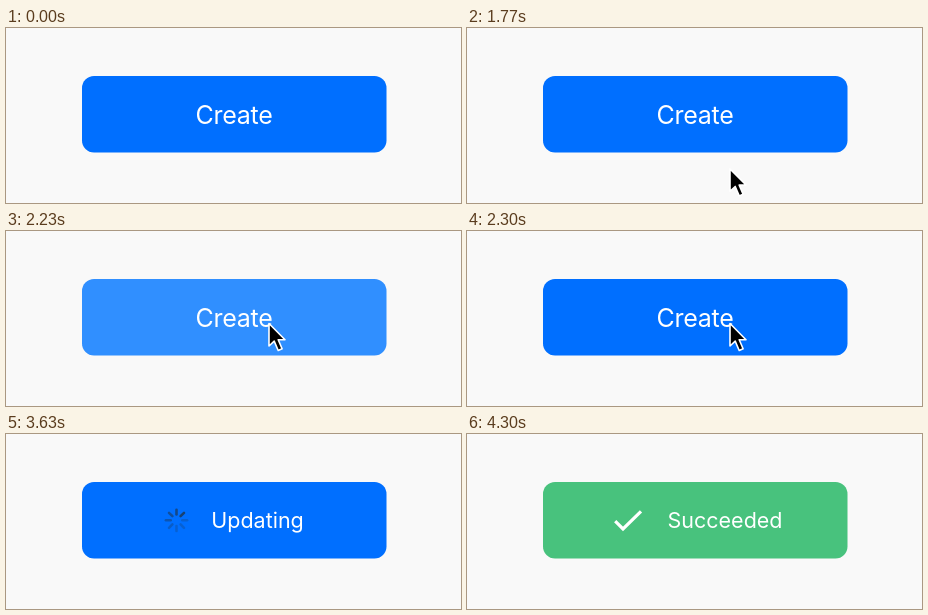
An HTML page for the animation above (4710 ms loop, 455 px wide and 175 px high).

```html
<!DOCTYPE html>
<html lang="en">
<head>
<meta charset="utf-8">
<title>Button states</title>
<style>
  html, body { margin: 0; width: 100%; height: 100%; overflow: hidden; background: #f9f9f9; }
  svg { display: block; width: 455px; height: 175px; }
  text { font: 400 21.5px Inter, Roboto, sans-serif; fill: #fff; text-anchor: middle; }
  #create { font-size: 25px; letter-spacing: -.25px; }
</style>
</head>
<body>
<svg viewBox="0 0 455 175">
  <rect id="button" x="76" y="48" width="304.5" height="76.5" rx="12"/>
  <text id="create" x="228" y="95.5">Create</text>
  <g id="updating">
    <g id="spinner" transform="translate(170.5 86.3)" stroke="#1d3a5c" stroke-width="2.6" stroke-linecap="round"></g>
    <text x="251.5" y="93.7">Updating</text>
  </g>
  <g id="done">
    <path d="M148.2 87.2 156 95 174 77.3" fill="none" stroke="#fff" stroke-width="3.2"/>
    <text x="258" y="93.7">Succeeded</text>
  </g>
  <path id="cursor" d="M0 0V22.5L5.2 17.6 9.2 27 13.1 25.3 9.2 16.2H16Z"
    stroke="#fff" stroke-width="1.6" stroke-linejoin="round"/>
</svg>
<script>
const LOOP = 4710, PRESS = 2230, RELEASE = 2300, UPDATE = 2630, DONE = 4300;
const ENTER = 1700, ARRIVE = 2000, LEAVE = 2430;
const SPOKES = 8, STEP = 125, SPIN_START = 2770;
const TIP = { x: 263, y: 92.5 }, TRAVEL = 83;

const $ = id => document.getElementById(id);
const show = (id, on) => $(id).style.display = on ? '' : 'none';
const clamp = v => Math.min(1, Math.max(0, v));

const spokes = Array.from({ length: SPOKES }, (_, i) => {
  const line = document.createElementNS('http://www.w3.org/2000/svg', 'line');
  line.setAttribute('y1', -5.8);
  line.setAttribute('y2', -10.6);
  line.setAttribute('transform', `rotate(${i * 360 / SPOKES})`);
  return $('spinner').appendChild(line);
});

function spin(t) {
  const lead = 3 + Math.floor((t - SPIN_START) / STEP);
  spokes.forEach((spoke, i) => {
    const age = ((lead - i) % SPOKES + SPOKES) % SPOKES;
    spoke.style.opacity = Math.max(.27, .86 - age * .13);
  });
}

// Eases in from below the stage and back out the same way.
function cursorDrop(t) {
  if (t < LEAVE) return TRAVEL * (1 - clamp((t - ENTER) / (ARRIVE - ENTER))) ** 2;
  return TRAVEL * clamp((t - LEAVE) / 230) ** 2;
}

function buttonColor(t) {
  if (t >= DONE) return '#48c27d';
  return t >= PRESS && t < RELEASE ? '#308fff' : '#006fff';
}

function draw(t) {
  $('button').setAttribute('fill', buttonColor(t));
  show('create', t < UPDATE);
  show('updating', t >= UPDATE && t < DONE);
  show('done', t >= DONE);
  show('cursor', t >= ENTER && t < UPDATE);
  $('cursor').setAttribute('transform', `translate(${TIP.x} ${TIP.y + cursorDrop(t)})`);
  spin(t);
}

const start = performance.now();
function tick() {
  draw((performance.now() - start) % LOOP);
  requestAnimationFrame(tick);
}
tick();
</script>
</body>
</html>
```
